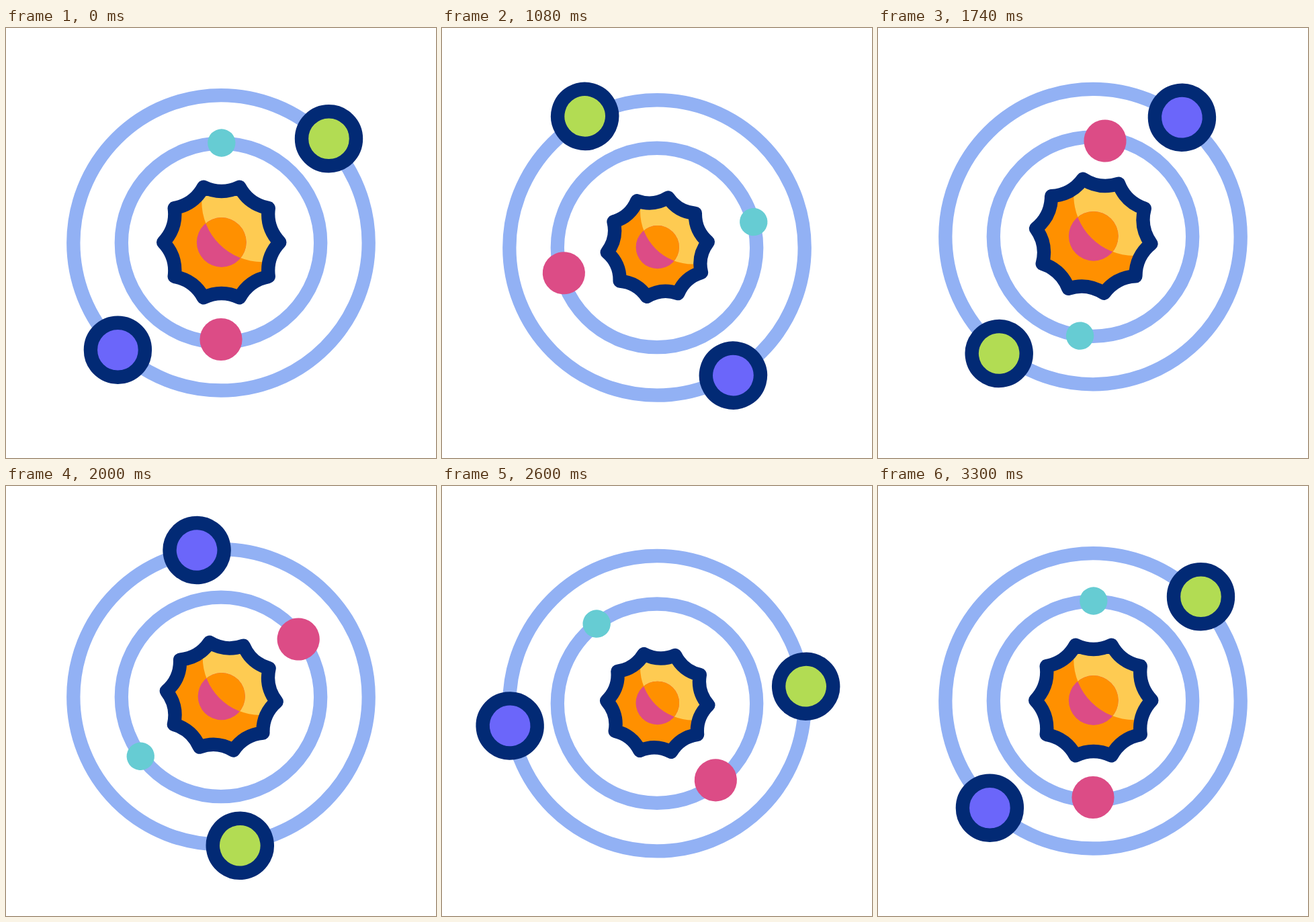
An HTML page that plays this animation: 640x640 px, repeating every 3600 ms.

```html
<!DOCTYPE html>
<html lang="en">
<head>
<meta charset="utf-8">
<title>Orbits</title>
<style>
  html, body { margin: 0; width: 100%; height: 100%; overflow: hidden; background: #fff; }
  svg { display: block; width: 100vw; height: 100vh; }
</style>
</head>
<body>
<svg viewBox="0 0 640 640">
  <defs>
    <clipPath id="starClip"><path id="clipPath"/></clipPath>
    <clipPath id="discClip"><circle id="discEdge"/></clipPath>
  </defs>
  <g id="system">
    <g fill="none" stroke="#92b1f4" stroke-width="20.3">
      <circle r="219.7"/>
      <circle r="148.2"/>
    </g>
    <g transform="translate(.75 -.8)">
      <g clip-path="url(#starClip)">
        <rect x="-110" y="-110" width="220" height="220" fill="#ff9000"/>
        <circle class="glow" fill="#fecb52"/>
      </g>
      <circle id="disc" fill="#dc4c86"/>
      <circle class="glow" fill="#ff9000" clip-path="url(#discClip)"/>
      <path id="star" fill="none" stroke="#022a75" stroke-width="20.3" stroke-linejoin="round"/>
    </g>
    <g id="inner">
      <circle cx=".8" cy="-148.8" r="20.7" fill="#66ccd3"/>
      <circle cy="143.7" r="31.6" fill="#dc4c86"/>
    </g>
    <g id="outer" stroke="#022a75" stroke-width="20.4">
      <circle cx="160.5" cy="-155" r="40.5" fill="#b2dc53"/>
      <circle cx="-153.6" cy="159.4" r="40.5" fill="#6b66fa"/>
    </g>
  </g>
</svg>
<script>
  const LOOP = 3600, END = 3300, STEP = 20;
  const $ = id => document.getElementById(id);
  const glows = document.querySelectorAll('.glow');

  // Keys are [time, value] pairs, eased in and out between neighbours.
  const SCALE = [[200, 1], [950, .86], [1700, 1], [2450, .86], [3200, 1]];
  const BOB = [[200, 0], [950, 8.6], [1700, -9.3], [2600, 3.9], [3300, 0]];
  const ORBIT = [[200, 0], [3200, 360]];
  const SPIN = [[40, 0], [3300, -324]];

  function at(keys, t) {
    if (t <= keys[0][0]) return keys[0][1];
    for (let i = 1; i < keys.length; i++) {
      const [t0, a] = keys[i - 1], [t1, b] = keys[i];
      if (t < t1) {
        const u = (t - t0) / (t1 - t0);
        return a + (b - a) * u * u * (3 - 2 * u);
      }
    }
    return keys[keys.length - 1][1];
  }

  function polar(r, deg) {
    const a = deg * Math.PI / 180;
    return (r * Math.cos(a)).toFixed(2) + ' ' + (r * Math.sin(a)).toFixed(2);
  }

  function starPath(scale, turn) {
    let d = 'M' + polar(86.6 * scale, turn);
    for (let i = 0; i < 10; i++) {
      const a = turn + i * 36;
      d += 'Q' + polar(69.6 * scale, a + 18) + ' ' + polar(86.6 * scale, a + 36);
    }
    return d + 'Z';
  }

  function setCircle(el, x, y, r) {
    el.setAttribute('cx', x);
    el.setAttribute('cy', y);
    el.setAttribute('r', r);
  }

  function draw(t) {
    const s = at(SCALE, t), orbit = at(ORBIT, t);
    const d = starPath(s, at(SPIN, t));
    $('system').setAttribute('transform', `translate(320 ${319.8 + at(BOB, t)})`);
    $('inner').setAttribute('transform', `rotate(${orbit})`);
    $('outer').setAttribute('transform', `rotate(${-orbit})`);
    $('star').setAttribute('d', d);
    $('clipPath').setAttribute('d', d);
    setCircle($('disc'), 0, 0, 36.9 * s);
    setCircle($('discEdge'), 0, 0, 36.9 * s);
    glows.forEach(g => setCircle(g, 60.5 * s, -60.8 * s, 90 * s));
  }

  function tick() {
    const t = performance.now() % LOOP;
    draw(Math.min(END, Math.floor(t / STEP) * STEP));
    requestAnimationFrame(tick);
  }
  tick();
</script>
</body>
</html>
```
